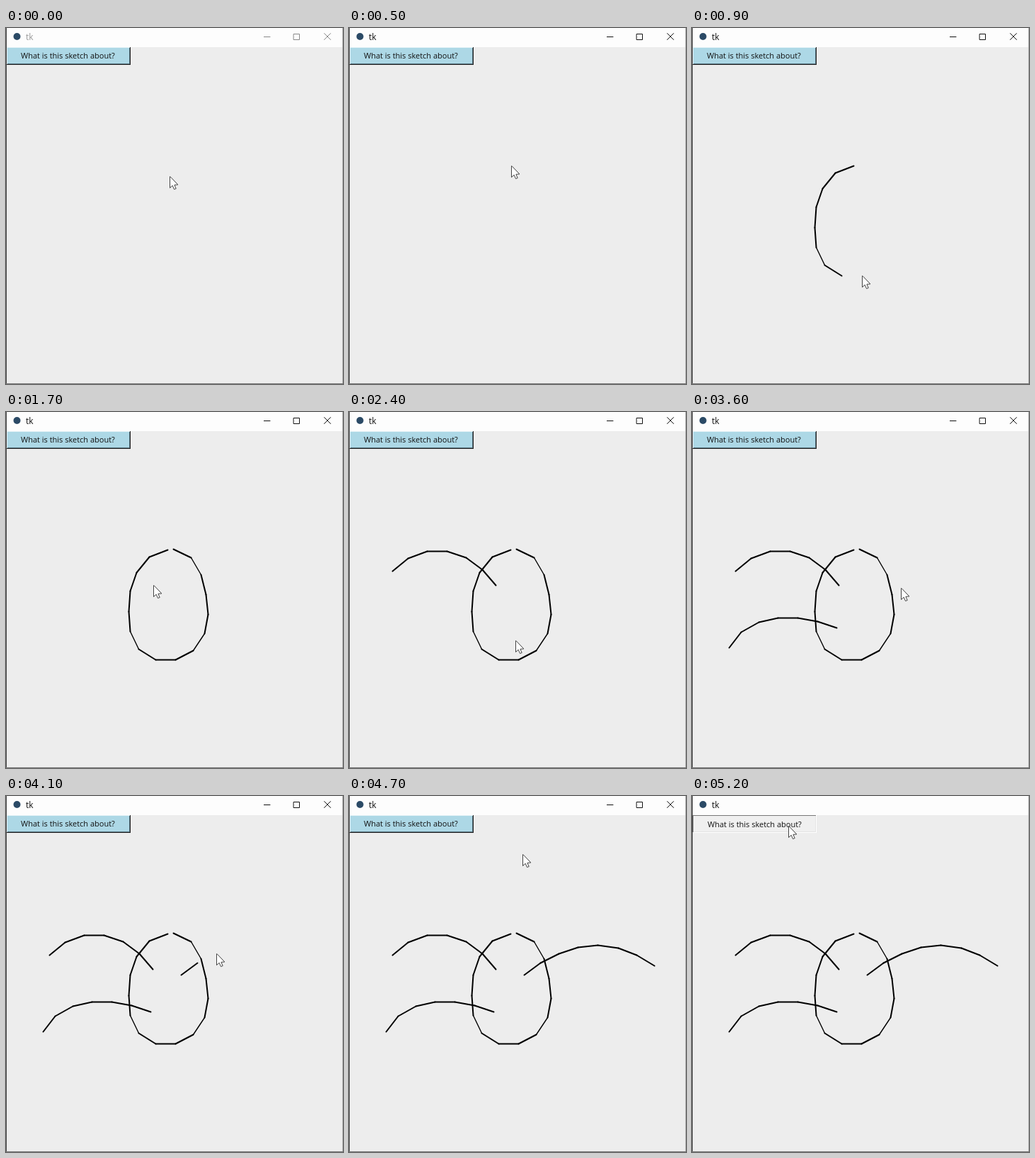
An HTML page with a canvas that plays this animation: 476 px wide and 502 px high, repeating every 5.3 s.

```html
<!DOCTYPE html>
<html lang="en">
<head>
<meta charset="utf-8">
<title>Sketch window</title>
<style>
  html, body { margin: 0; width: 100%; height: 100%; overflow: hidden; }
  canvas { display: block; }
  svg { position: absolute; width: 0; height: 0; }
</style>
</head>
<body>
<canvas id="stage" width="476" height="502"></canvas>
<!-- Curves the hand follows; data-at is the step when the button goes down -->
<svg>
  <path data-at="5" d="M229,194 C188,200 172,238 174,285 C173,310 182,350 225,350
    C262,352 285,322 286,284 C286,258 276,194 237,193"/>
  <path data-at="17" d="M208,244 C174,194 112,173 62,224"/>
  <path data-at="28" d="M205,304 C160,283 80,277 53,332"/>
  <path data-at="40" d="M248,252 C304,208 364,191 432,239"/>
</svg>
<script>
const ctx = document.getElementById('stage').getContext('2d');
const STEP = 100, STEPS = 53, SEGMENT = 28.6;

// Sample each curve into equal straight segments, two per step.
const strokes = [...document.querySelectorAll('path')].map(path => {
  const at = +path.dataset.at, length = path.getTotalLength();
  const count = Math.round(length / SEGMENT);
  const pts = Array.from({ length: count + 1 }, (_, i) => {
    const p = path.getPointAtLength(length * i / count);
    return [Math.round(p.x), Math.round(p.y)];
  });
  return { at, end: at + Math.ceil(count / 2), count, pts };
});

// Pointer stops between strokes: step, x, y
const trail = [
  [0, 231, 209], [3, 231, 209], [15, 214, 300], [24, 235, 322], [33, 75, 381],
  [36, 295, 248], [47, 245, 82], [48, 150, 41], [52, 136, 42],
  ...strokes.flatMap(s => [[s.at, ...s.pts[0]], [s.end, ...s.pts[s.count]]])
].sort((a, b) => a[0] - b[0]);

function pointer(k) {
  const s = strokes.find(s => k >= s.at && k <= s.end);
  if (s) return s.pts[Math.min(2 * (k - s.at), s.count)];
  const next = Math.max(1, trail.findIndex(stop => stop[0] >= k));
  const [t, x, y] = trail[next - 1], [t2, x2, y2] = trail[next];
  const f = (k - t) / (t2 - t);
  return [Math.round(x + (x2 - x) * f), Math.round(y + (y2 - y) * f)];
}

function rect(color, x, y, w, h) {
  ctx.fillStyle = color;
  ctx.fillRect(x, y, w, h);
}

function text(str, x, y, size, color) {
  ctx.font = `${size}px "Open Sans", sans-serif`;
  ctx.fillStyle = color;
  ctx.fillText(str, x, y);
}

function line(width, color, ...pts) {
  ctx.lineWidth = width;
  ctx.strokeStyle = color;
  ctx.beginPath();
  pts.forEach(p => ctx.lineTo(...p));
  ctx.stroke();
}

function drawWindow(active, controls) {
  rect('#ededed', 0, 0, 476, 502);
  rect('#fdfdfd', 0, 0, 476, 27);
  rect('#444', 0, 0, 1, 502);
  rect('#aaa', 475, 0, 1, 502);
  rect('#777', 0, 501, 476, 1);

  ctx.fillStyle = '#2b4a66';
  ctx.beginPath();
  ctx.arc(15.5, 12, 5, 0, 7);
  ctx.fill();
  text('tk', 28, 17, 12, active ? '#111' : '#999');

  if (!controls) return;
  const color = active ? '#111' : '#888';
  line(1, color, [364, 12.5], [373, 12.5]);
  ctx.strokeRect(406.5, 8.5, 8, 8);
  line(1, color, [449.5, 7.5], [458.5, 16.5]);
  line(1, color, [458.5, 7.5], [449.5, 16.5]);
}

function drawButton(pressed) {
  const [topLeft, bottomRight, inner, face] = pressed
    ? ['#777', '#fff', '#e3e3e3', '#f0f0f0']
    : ['#e4f2f7', '#222', '#587480', '#add8e6'];
  rect(bottomRight, 1, 27, 175, 25);
  rect(topLeft, 1, 27, 174, 24);
  rect(inner, 2, 28, 173, 23);
  rect(face, 2, 28, 172, 22);
  const shift = pressed ? 1 : 0;
  text('What is this sketch about?', 21 + shift, 43 + shift, 11, '#111');
}

// The ink trails the pointer by one segment.
function drawStroke(s, k) {
  const drawn = Math.min(2 * (k - s.at) - 1, s.count);
  for (let i = 0; i < drawn; i++) {
    const a = s.pts[i], b = s.pts[i + 1];
    const slope = Math.abs((b[1] - a[1]) / (b[0] - a[0]));
    // Steep diagonals come out thinner, as in unsmoothed rendering.
    line(slope > 1.3 && slope < 2.4 ? 1.4 : 2, '#000', a, b);
  }
}

function drawPointer([x, y]) {
  ctx.save();
  ctx.translate(x + .5, y + .5);
  ctx.beginPath();
  [[0, 0], [0, 16], [3.7, 12.7], [6, 18], [8.7, 17], [6.4, 11.8], [11, 11.5]].forEach(p => ctx.lineTo(...p));
  ctx.closePath();
  ctx.fillStyle = '#fff';
  ctx.fill();
  ctx.lineWidth = 1;
  ctx.strokeStyle = '#444';
  ctx.stroke();
  ctx.restore();
}

function render(now) {
  const k = Math.floor(now / STEP) % STEPS;
  ctx.lineCap = ctx.lineJoin = 'round';
  drawWindow(k >= 5, k < 52);
  drawButton(k >= 51);
  ctx.save();
  ctx.translate(-.5, .5);
  strokes.forEach(s => drawStroke(s, k));
  ctx.restore();
  drawPointer(pointer(k));
  requestAnimationFrame(render);
}
requestAnimationFrame(render);
</script>
</body>
</html>
```
